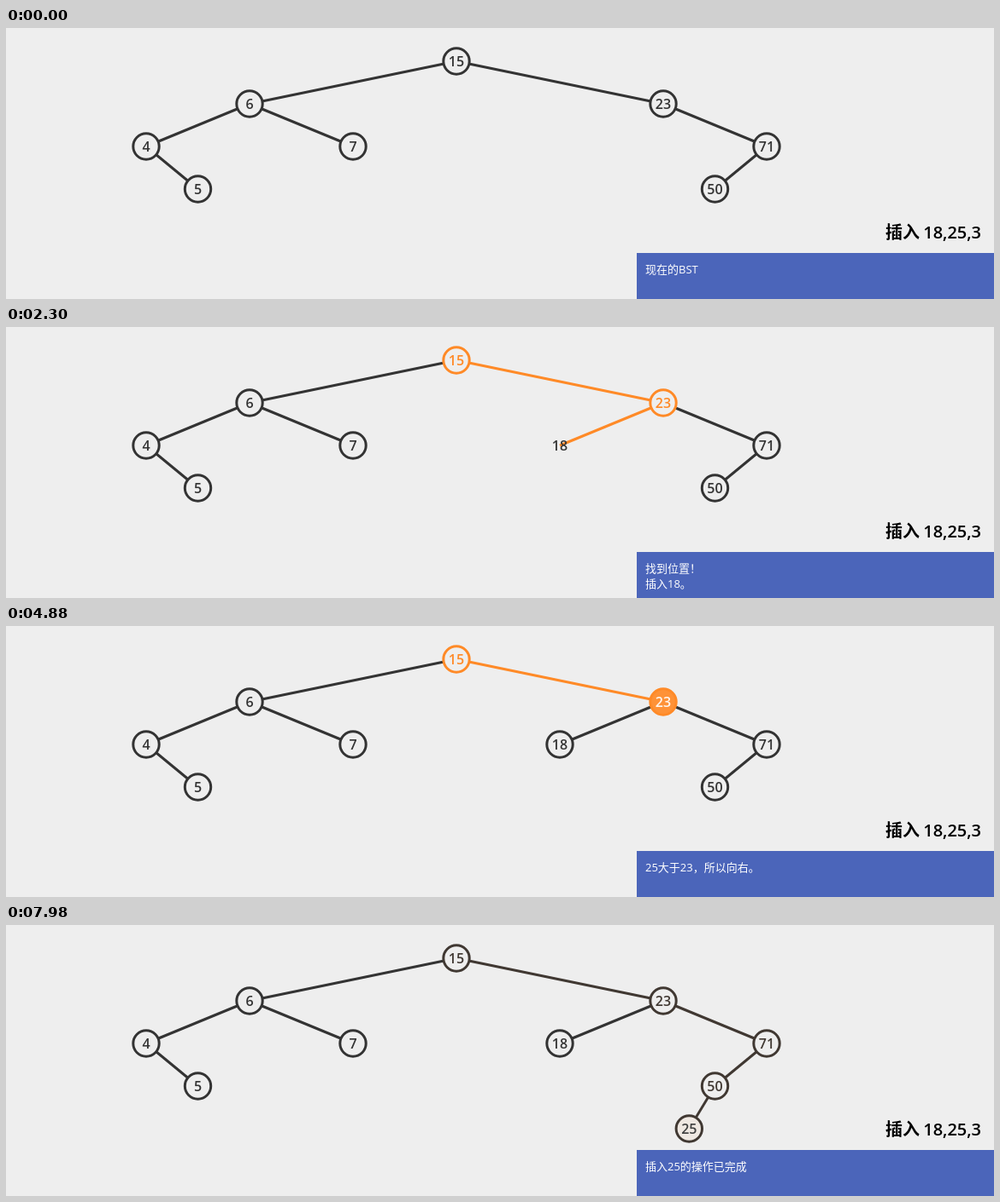
An HTML page with a canvas for the animation above (8 s loop, 1156x318 px).

```html
<!DOCTYPE html>
<html lang="zh-CN">
<head>
<meta charset="utf-8">
<title>BST 插入</title>
<style>
  html, body { margin: 0; width: 100%; height: 100%; overflow: hidden; background: #eee; }
  canvas { display: block; }
</style>
</head>
<body>
<canvas id="stage" width="1156" height="318"></canvas>
<script>
const ctx = document.getElementById('stage').getContext('2d');
const LOOP = 8000, STEP = 480, FADE = 460, FIRST = 436;
const FONT = '"Open Sans", "Noto Sans CJK SC", "Noto Sans CJK", sans-serif';
const BG = [238, 238, 238], DARK = [51, 51, 51], ORANGE = [255, 138, 39], WHITE = [255, 255, 255];

// key: [x, y, parent]
const TREE = {
  15: [527, 39], 6: [285, 89, 15], 23: [769, 89, 15],
  4: [164, 139, 6], 7: [406, 139, 6], 18: [648, 139, 23], 71: [890, 139, 23],
  5: [224.5, 189, 4], 50: [829.5, 189, 71], 25: [799.3, 239, 50]
};
const INSERTS = [
  { key: 18, path: [15, 23], start: FIRST },
  { key: 25, path: [15, 23, 71, 50], start: FIRST + 6 * STEP }
];

const ease = t => t < 0.5 ? 4 * t ** 3 : 1 - 4 * (1 - t) ** 3;
const clamp = t => Math.max(0, Math.min(1, t));
const mix = (a, b, p) => a.map((v, i) => v + (b[i] - v) * p);
const css = c => `rgb(${c.map(Math.round)})`;

function sceneAt(time) {
  const job = INSERTS.filter(i => time >= i.start).pop();
  const fade = { lit: 0 };
  const scene = { time, job, message: ['现在的BST'], lit: 1 };
  if (!job) return scene;

  const { key, path, start } = job;
  const step = Math.floor((time - start) / STEP);
  const current = path[Math.min(step >> 1, path.length - 1)];
  const popStep = path.length * 2;
  // Eased progress of a given step of this insertion
  scene.raw = n => clamp((time - start - n * STEP) / FADE);
  scene.popStep = popStep;
  scene.step = step;
  scene.lit = 1 - ease(scene.raw(popStep + 1));

  if (step > popStep) scene.message = [`插入${key}的操作已完成`];
  else if (step >= popStep - 1) scene.message = ['找到位置！', `插入${key}。`];
  else if (step % 2 === 0) scene.message = [`将${key}与${current}进行比较`];
  else scene.message = [`${key}${key > current ? '大于' : '小于'}${current}，所以向${key > current ? '右' : '左'}。`];
  return scene;
}

function visible(key, { time, job, step, popStep }) {
  const insert = INSERTS.find(i => i.key === +key);
  if (!insert) return true;
  return time >= insert.start + (insert.path.length * 2 - 1) * STEP;
}

function line(x1, y1, x2, y2, width, color) {
  ctx.lineWidth = width;
  ctx.strokeStyle = css(color);
  ctx.beginPath();
  ctx.moveTo(x1, y1);
  ctx.lineTo(x2, y2);
  ctx.stroke();
}

function drawEdge(key, scene) {
  const [x, y, parent] = TREE[key];
  if (!parent) return;
  const [px, py] = TREE[parent];
  const { job } = scene;
  const route = job ? [...job.path, job.key] : [];
  const index = route.indexOf(+key);
  const t = index > 0 ? scene.raw(index * 2 - 1) : 0;
  const isNew = job && job.key === +key;

  if (t >= 0.9) return line(px, py, x, y, 3, mix(DARK, ORANGE, scene.lit));
  if (!isNew) line(px, py, x, y, 3, DARK);
  if (t > 0) {
    const p = ease(t);
    line(px, py, px + (x - px) * p, py + (y - py) * p, 10, ORANGE);
  }
}

function drawNode(key, scene) {
  const [x, y] = TREE[key];
  const { job, lit } = scene;
  let ring = DARK, fill = BG, ink = DARK, size = 1;

  if (job && job.key === +key) {
    size = ease(scene.raw(scene.popStep));
    ring = mix(DARK, ORANGE, lit);
    fill = mix(BG, ORANGE, lit);
    ink = mix(DARK, WHITE, size * lit);
  } else if (job && job.path.includes(+key)) {
    const index = job.path.indexOf(+key);
    const on = ease(scene.raw(index * 2));
    const off = ease(scene.raw(index * 2 + 1));
    ring = mix(DARK, ORANGE, on * lit);
    fill = mix(BG, ORANGE, on * (1 - off));
    ink = mix(mix(mix(DARK, WHITE, on), ORANGE, off), DARK, 1 - lit);
  }

  if (size > 0) {
    ctx.beginPath();
    ctx.arc(x, y, 15.2 * size, 0, Math.PI * 2);
    ctx.fillStyle = css(fill);
    ctx.fill();
    ctx.lineWidth = 3 * size;
    ctx.strokeStyle = css(ring);
    ctx.stroke();
  }
  text(key, x, y + 5.5, `600 16px ${FONT}`, css(ink), 'center');
}

function text(value, x, y, font, color, align) {
  ctx.font = font;
  ctx.fillStyle = color;
  ctx.textAlign = align;
  ctx.fillText(value, x, y);
}

function draw(time) {
  const scene = sceneAt(time);
  ctx.fillStyle = css(BG);
  ctx.fillRect(0, 0, 1156, 318);

  const keys = Object.keys(TREE).filter(key => visible(key, scene));
  keys.forEach(key => drawEdge(key, scene));
  keys.forEach(key => drawNode(key, scene));

  text('插入', 1029, 247, `bold 20px ${FONT}`, '#000', 'left');
  text('18,25,3', 1141, 247, `600 20px ${FONT}`, '#000', 'right');
  ctx.fillStyle = '#4b65ba';
  ctx.fillRect(738, 264, 418, 54);
  scene.message.forEach((row, i) => text(row, 748, 288 + i * 18, `13px ${FONT}`, '#fff', 'left'));
}

const origin = performance.now();
function tick() {
  draw((performance.now() - origin) % LOOP);
  requestAnimationFrame(tick);
}
tick();
</script>
</body>
</html>
```
